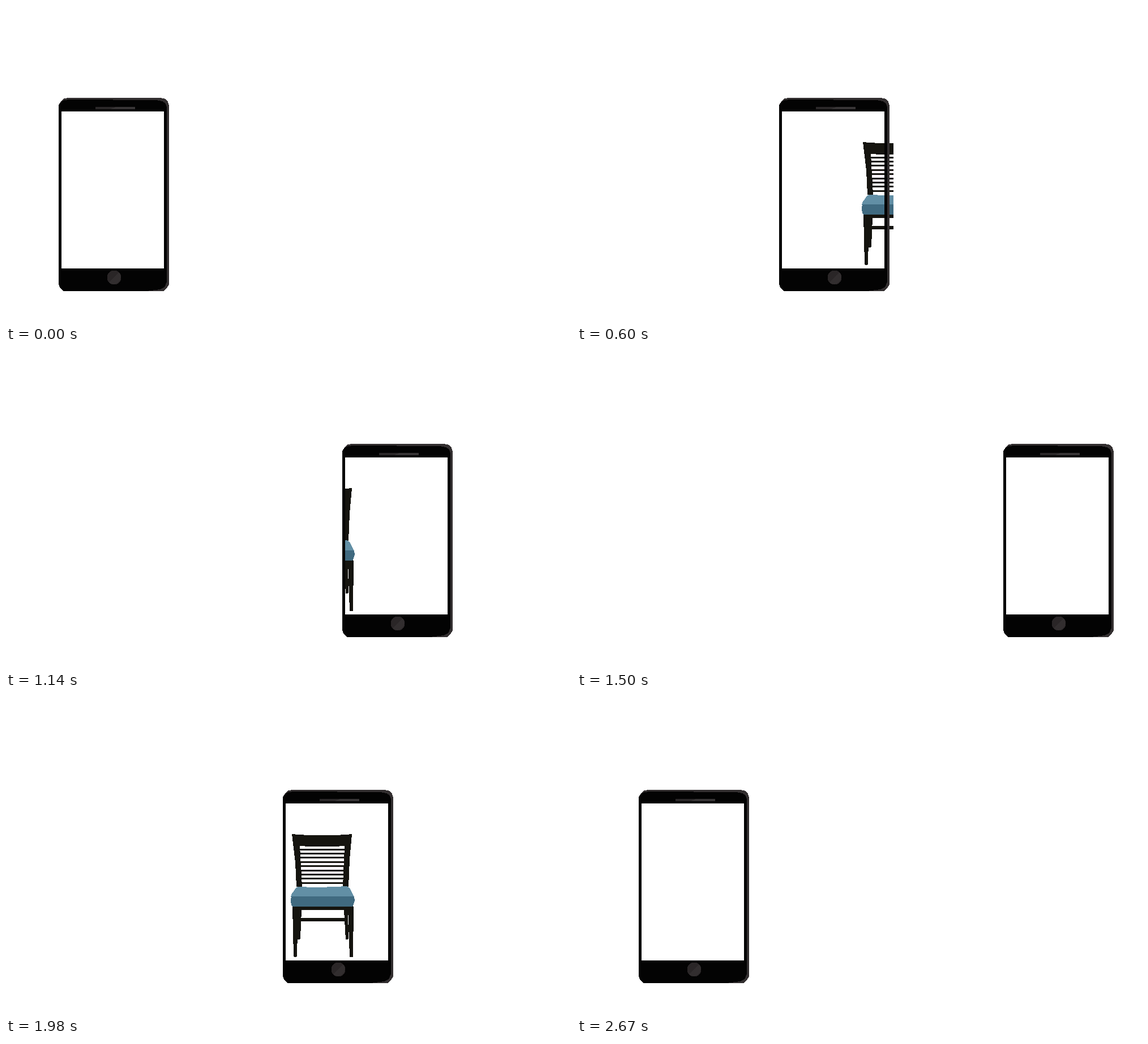
Write an HTML page that moves like this. It is 998 px wide and 561 px high and loops after 2.7 s.

```html
<!DOCTYPE html>
<html lang="en">
<head>
<meta charset="utf-8">
<title>Phone scanning a chair</title>
<style>
  html, body { margin: 0; height: 100%; overflow: hidden; background: #fff; }
  svg { display: block; width: 998px; height: 561px; shape-rendering: crispEdges; }
</style>
</head>
<body>
<svg viewBox="0 0 998 561">
  <clipPath id="reveal"><rect id="window" y="162" height="341"/></clipPath>

  <g clip-path="url(#reveal)" fill="#15140f">
    <path fill="#fcf4fc" d="M520 284H598L597 312H521Z"/>
    <path d="M505 240L517 241Q558 244 600 241L611 240L607 285L605 333H595L598 261Q558 264 519 261L523 333H513L511 290Z"/>
    <path id="slats" fill="none" stroke="#15140f" stroke-width="3"/>
    <path d="M506 367H613V374H506Z M519 388H600V394H519Z"/>
    <path d="M506 368H516L514 455L512 457H509L508 455Z M515 374H522L520 424L518 426H514Z"/>
    <path d="M604 368H614L613 457H607Z M597 374H604L605 424L603 426H600Z"/>
    <path fill="#628fa5" d="M517 333Q559 335 602 332L607 335L615 351H503L505 345L513 334Z"/>
    <path fill="#406a80" d="M504 350H615L616 358L613 367L611 368H506L504 366L503 357Z"/>
  </g>

  <g id="phone">
    <path fill="#332f30" fill-rule="evenodd" d="M0 13L4 6L10 1L17 0H179L189 2L193 7L195 14V329L191 336L185 341H9L2 335L0 328Z M5 24H186V301H5Z"/>
    <path fill="#030303" fill-rule="evenodd" d="M0 13L4 7L10 4L20 3L172 4L183 6L189 10L191 17V325L187 334L179 338L155 341H9L2 335L0 328Z M5 24H186V301H5Z"/>
    <path fill="#2b2829" d="M65 16H135V20H65Z"/>
    <path fill="#383536" d="M101 16H135V20H92Z"/>
    <circle cx="98" cy="317" r="12.5" fill="#2a2627"/>
    <path fill="#322e2f" d="M106.8 308.2A12.5 12.5 0 0 1 89.2 325.8Z"/>
  </g>
</svg>
<script>
  const STEP = 30, STEPS = 90, TURN = 50;
  const phone = document.getElementById('phone');
  const view = document.getElementById('window');

  let slats = '';
  for (let i = 0; i < 9; i++) slats += `M517 ${267 + i * 7.4}H600`;
  document.getElementById('slats').setAttribute('d', slats);

  // The phone trims the chair on its left; a slower wipe trims it on the right.
  function draw(now) {
    const k = Math.floor(now / STEP) % STEPS;
    const x = Math.floor(k < TURN ? 93 + 13.2 * k : 753 - 16.5 * (k - TURN));
    const right = k < TURN ? 319 + 12 * k : 1725 - 15.75 * k;
    phone.setAttribute('transform', `translate(${x} 162)`);
    view.setAttribute('x', x + 3);
    view.setAttribute('width', Math.max(0, Math.round(right) - x - 3));
    requestAnimationFrame(draw);
  }
  draw(performance.now());
</script>
</body>
</html>
```
